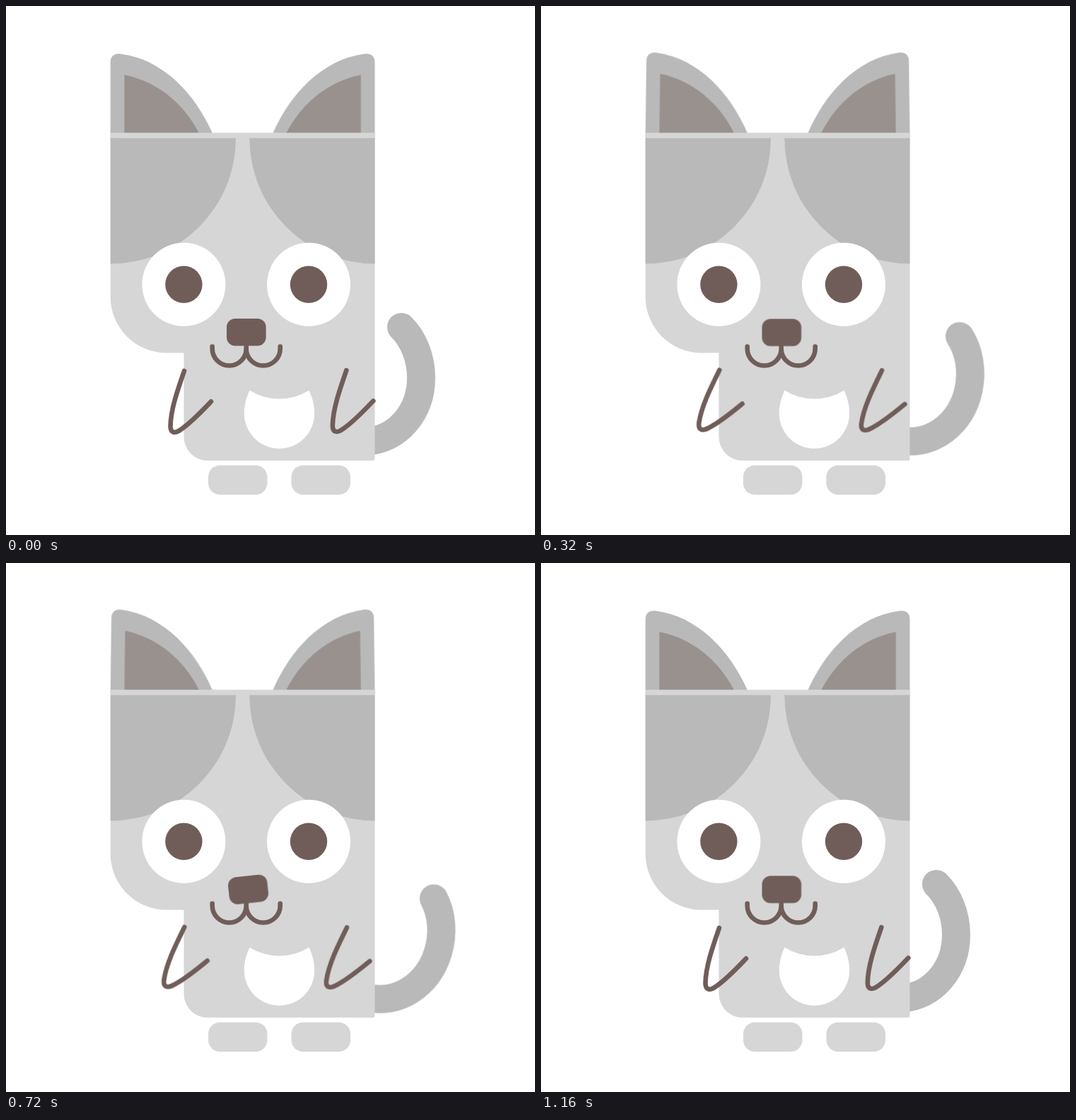
These frames come from a looping animation (748x748 px, 1200 ms). An HTML page without scripts:

```html
<!DOCTYPE html>
<html lang="en">
<head>
<meta charset="utf-8">
<title>Grey cat</title>
<style>
  html, body { margin: 0; width: 100%; height: 100%; overflow: hidden; background: #fff; }
  svg { display: block; width: 100vw; height: 100vh; }

  .light { fill: #d6d6d6; }
  .dark { fill: #b9b9b9; }
  .inner { fill: #99918e; }
  .brown { fill: #705d5a; }
  .white { fill: #fff; }
  .line { fill: none; stroke: #705d5a; stroke-width: 6.6; stroke-linecap: round; stroke-linejoin: round; }

  /* ears and arms: up and back in 400 ms, holding at both ends */
  .swing { animation: swing 400ms -2ms infinite; }
  .ear-l { --turn: 3deg; transform-origin: 292px 180px; }
  .ear-r { --turn: -3deg; transform-origin: 377px 180px; }
  .arm-l { --turn: 28.4deg; transform-origin: 262px 518px; }
  .arm-r { --turn: 28.4deg; transform-origin: 479.8px 520.9px; }
  @keyframes swing {
    0%, 100% { transform: rotate(0deg); animation-timing-function: steps(5, jump-none); }
    50% { transform: rotate(var(--turn)); animation-timing-function: steps(5, jump-none); }
  }

  .tail {
    fill: none; stroke: #b9b9b9; stroke-width: 40; stroke-linecap: round;
    transform-origin: 514px 617px;
    animation: wag 600ms -2ms infinite;
  }
  @keyframes wag {
    0% { transform: rotate(0deg); animation-timing-function: steps(3); }
    20% { transform: rotate(17.1deg); animation-timing-function: step-end; }
    26.667% { transform: rotate(21deg); animation-timing-function: step-end; }
    40% { transform: rotate(18.05deg); animation-timing-function: steps(3); }
    60% { transform: rotate(9.05deg); animation-timing-function: step-end; }
    73.333% { transform: rotate(6deg); animation-timing-function: steps(2); }
    86.667%, 100% { transform: rotate(0deg); }
  }

  .nose { transform-origin: 339.8px 461px; animation: sniff 600ms -2ms infinite; }
  @keyframes sniff {
    0% { transform: translate(0px, 0px) rotate(0deg); animation-timing-function: steps(3); }
    20% { transform: translate(2.7px, .4px) rotate(-6.3deg); animation-timing-function: step-end; }
    26.667% { transform: translate(3px, .5px) rotate(-7deg); animation-timing-function: step-end; }
    40% { transform: translate(2.2px, .4px) rotate(-4.6deg); animation-timing-function: steps(2); }
    53.333%, 100% { transform: translate(.5px, .4px) rotate(0deg); }
  }
</style>
</head>
<body>
<svg viewBox="0 0 748 748" xmlns="http://www.w3.org/2000/svg">
  <defs>
    <g id="ear">
      <path class="dark" d="M147.7 188V80Q147.7 67 161 67.5C222 75 267 124 292 180V188Z"/>
      <path class="inner" d="M167.4 188V97.5C212 106 250 136 272.5 179L276 188Z"/>
    </g>
    <path id="arm" class="line" d="M252 516C243 542 233 570 232.5 594C232.5 604 239 605 247 599C262 589 276 574 290 559.3"/>
    <g id="eye">
      <circle class="white" r="59"/>
      <circle class="brown" r="26.2"/>
    </g>
    <rect id="foot" class="light" y="649.5" width="83.5" height="41.5" rx="16.5"/>
  </defs>

  <path class="tail" d="M510 615.5C554 613 587 574 587 525.5C587 497 576 471 559 454"/>

  <g class="swing ear-l"><use href="#ear"/></g>
  <g class="swing ear-r"><use href="#ear" transform="matrix(-1 0 0 1 669.2 0)"/></g>

  <path class="light" d="M147.7 179.3H521.5V640q0 2.8-2.8 2.8H285a33.5 33.5 0 0 1-33.5-33.5V490.5H227a79.3 79.3 0 0 1-79.3-79.3Z"/>
  <path class="dark" d="M147.7 186.7H325A177.6 177.6 0 0 1 147.7 364.5Z"/>
  <path class="dark" d="M521.5 186.7H344.3A177.6 177.6 0 0 0 521.5 364.5Z"/>

  <use href="#eye" x="251.4" y="393.8"/>
  <use href="#eye" x="428" y="393.8"/>

  <path class="line" d="M291.7 481.5v3a24 24 0 0 0 48 0v-3v3a24 24 0 0 0 48 0v-3"/>
  <rect class="brown nose" x="312" y="442" width="55.6" height="38.4" rx="12"/>

  <path class="white" d="M344.5 543.5A79.5 79.5 0 0 0 428.5 543.5C433 553 436.2 564 436.2 576A49.7 49.7 0 0 1 336.8 576C336.8 564 340 553 344.5 543.5Z"/>

  <g class="swing arm-l"><use href="#arm"/></g>
  <g class="swing arm-r"><use href="#arm" x="229.3" y="-.8"/></g>

  <use href="#foot" x="286"/>
  <use href="#foot" x="403.5"/>
</svg>
</body>
</html>
```
